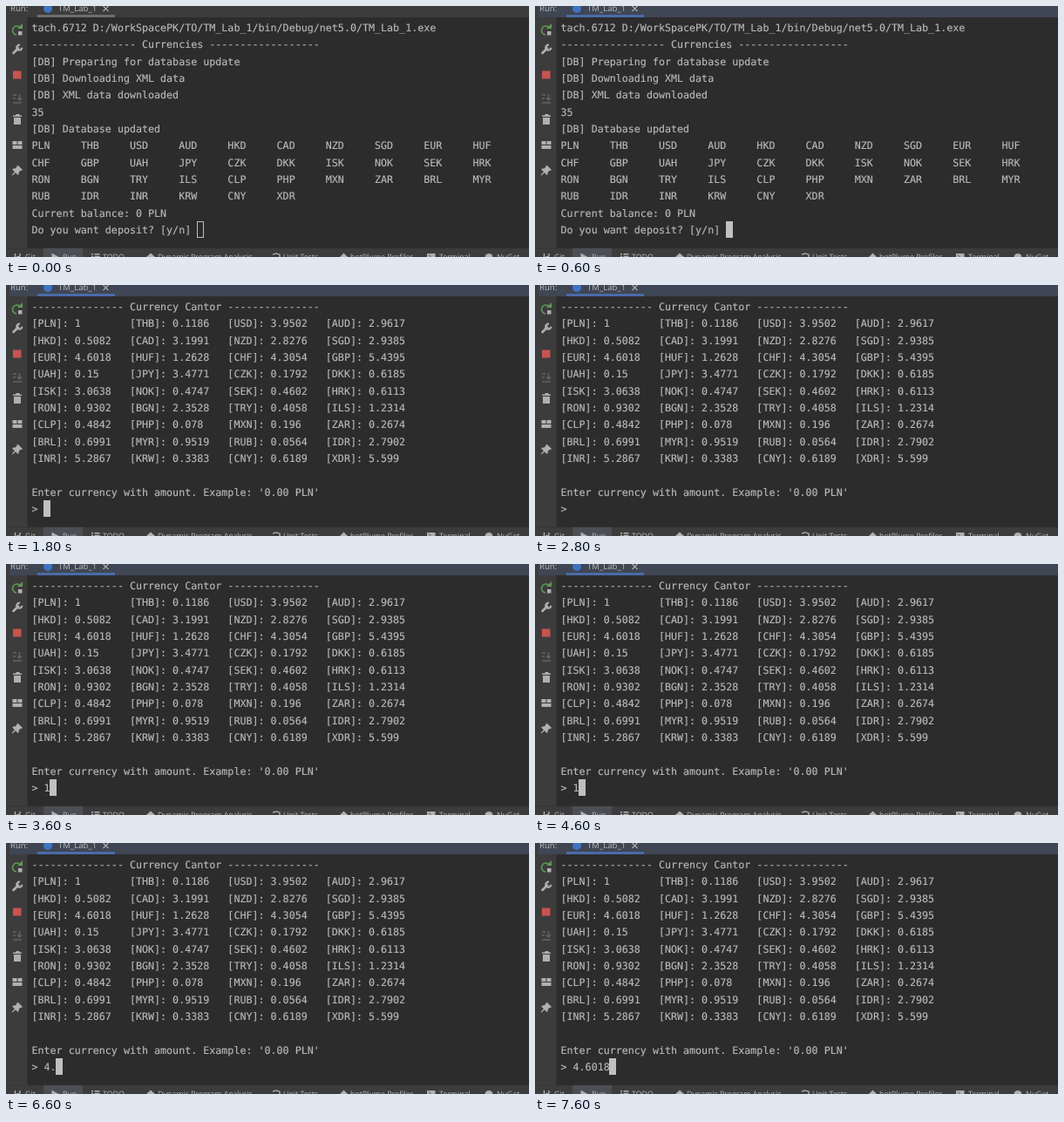
These frames come from a looping animation (600x288 px, 8000 ms). An HTML page:

```html
<!DOCTYPE html>
<html lang="en">
<head>
<meta charset="utf-8">
<title>Currency console</title>
<style>
  html, body { margin: 0; width: 100%; height: 100%; overflow: hidden; background: #2d2c2d; }
  svg { position: absolute; left: 0; top: 0; }
  svg text { font-family: "Open Sans", "Noto Sans", sans-serif; fill: #bbb; text-rendering: geometricPrecision; }
  .tab { font-size: 9.6px; }
  .tool { font-size: 8.8px; }
  .line { fill: none; stroke: #b0b0b0; stroke-width: 1.4; }
  .solid { fill: #b0b0b0; }
  #console {
    position: absolute; left: 29.5px; top: 16px; margin: 0; color: #b9b9b9;
    font: 11.68px/19.333px "DejaVu Sans Mono", monospace;
    text-rendering: geometricPrecision; font-variant-ligatures: none;
    -webkit-text-stroke: 0.15px #b9b9b9;
  }
  #cursor {
    position: absolute; top: 230.7px; width: calc(1ch + 1px); height: 19px;
    box-sizing: border-box; border: 1px solid #c0c0c0;
  }
</style>
</head>
<body>
<svg width="600" height="288" viewBox="0 0 600 288">
  <!-- window chrome -->
  <path fill="#3d3c3d" d="M0 0H600V13H24.5V278H600V288H0Z"/>
  <path id="header" d="M4 0H600V13H4Z"/>
  <path id="tabLine" d="M36 10H125V13H36Z"/>
  <path fill="#323232" d="M24 13h1V278h-1ZM0 277.5H600v.8H0Z"/>
  <path fill="#4b4e52" d="M43 278H88V288H43Z"/>
  <text class="tab" x="5" y="6">Run:</text>
  <circle cx="48" cy="3" r="5" fill="#3f74c4"/>
  <text class="tab" x="60" y="6">TM_Lab_1</text>
  <path class="line" style="stroke-width:1.1" d="M111.5 0l6 6m0-6l-6 6"/>

  <!-- side toolbar -->
  <path fill="none" stroke="#5f9a54" stroke-width="1.6" d="M16.5 25A5 5 0 1 0 12 33"/>
  <path fill="#5f9a54" d="M13 26h6v-6Z"/>
  <path class="solid" d="M14 29h4.5v4.5H14Z"/>
  <path class="line" stroke-linecap="round" style="stroke-width:2.6" d="M8.5 54l5.5-5.5"/>
  <path class="line" style="stroke-width:2.2" d="M16 44.8a3 3 0 1 0 2.3 3"/>
  <path fill="#c75450" d="M8 74.5h9.5v9H8Z"/>
  <path class="line" style="stroke:#646364" d="M8 102h4M8 106h3M8 111h10M15.5 101v7m-2.5-2.5l2.5 2.5l2.5-2.5"/>
  <path class="solid" d="M8 125.5h3l1-1.5h3l1 1.5h2v1.5H8ZM9 128h8v8H9Z"/>
  <path class="solid" d="M7.5 155h5v4h-5ZM13.5 155h5v4h-5ZM7.5 160h11v4h-11Z"/>
  <path class="solid" d="M14 183l5 5l-1.2 1l-1-.3l-2 2l-.2 2.3l-1 1l-2.7-2.7l-3.4 3.2l-.8-.8l3.2-3.4l-2.7-2.7l1-1l2.3-.2l2-2l-.3-1Z"/>

  <!-- bottom tool buttons -->
  <g class="line">
    <path d="M10.5 284v4M16 284v2.5q0 1.5-4 1.5"/>
    <path d="M98 284.7h2m1.5 0h6M98 287.5h2m1.5 0h6"/>
    <path d="M306 285.2l4-1.3l4 1.3V290"/>
  </g>
  <g class="solid">
    <path d="M52.5 283.5v9l8-4.5Z"/>
    <path d="M161 288l5-4.5l5 4.5Z"/>
    <path d="M383 288l4.5-4.5l4.5 4.5Z"/>
    <path d="M483 284h9.5v4H483Z"/>
    <circle cx="554" cy="288.5" r="4.5"/>
  </g>
  <path fill="none" stroke="#3d3c3d" d="M485 285.5l2 2l-2 2"/>
  <g id="tools"></g>
</svg>
<pre id="console"><span id="output"></span><span id="cursor"></span></pre>

<script>
const $ = id => document.getElementById(id);
const LOOP = 8000, FOCUS_AT = 600, RATES_AT = 1800;
const dashes = n => "-".repeat(n);
const grid = (cells, columns, width) => {
  const rows = [];
  for (let i = 0; i < cells.length; i += columns)
    rows.push(cells.slice(i, i + columns).map(c => c.padEnd(width)).join(""));
  return rows.join("\n");
};

const rates = `PLN 1,THB 0.1186,USD 3.9502,AUD 2.9617,HKD 0.5082,CAD 3.1991,NZD 2.8276,SGD 2.9385,
EUR 4.6018,HUF 1.2628,CHF 4.3054,GBP 5.4395,UAH 0.15,JPY 3.4771,CZK 0.1792,DKK 0.6185,
ISK 3.0638,NOK 0.4747,SEK 0.4602,HRK 0.6113,RON 0.9302,BGN 2.3528,TRY 0.4058,ILS 1.2314,
CLP 0.4842,PHP 0.078,MXN 0.196,ZAR 0.2674,BRL 0.6991,MYR 0.9519,RUB 0.0564,IDR 2.7902,
INR 5.2867,KRW 0.3383,CNY 0.6189,XDR 5.599`.split(",").map(r => r.trim().split(" "));

const startScreen = `tach.6712 D:/WorkSpacePK/TO/TM_Lab_1/bin/Debug/net5.0/TM_Lab_1.exe
${dashes(17)} Currencies ${dashes(18)}
[DB] Preparing for database update
[DB] Downloading XML data
[DB] XML data downloaded
35
[DB] Database updated
${grid(rates.map(r => r[0]), 10, 8)}
Current balance: 0 PLN
Do you want deposit? [y/n] `;

const ratesScreen = `${dashes(15)} Currency Cantor ${dashes(15)}
${grid(rates.map(([code, rate]) => `[${code}]: ${rate}`), 4, 16)}

Enter currency with amount. Example: '0.00 PLN'
> `;

// [start time, typed text, cursor style]
const steps = [
  [0, "", "hollow"], [600, "", "on"], [1600, "", "off"],
  [1800, "", "on"], [2800, "", "off"], [3400, "", "on"],
  [3600, "1", "on"], [4200, "1", "off"], [4600, "1", "on"],
  [5200, "", "off"], [5400, "", "on"], [5600, "4", "on"],
  [6600, "4.", "on"], [6800, "4.6", "on"], [7200, "4.601", "on"], [7600, "4.6018", "on"]
];

const tools = [
  [22, "Git"], [65, "Run"], [111, "TODO"], [174, "Dynamic Program Analysis"], [318, "Unit Tests"],
  [395, "hotPlume Profiler"], [497, "Terminal"], [563, "NuGet"]
];
$("tools").innerHTML = tools.map(([x, label]) => `<text class="tool" x="${x}" y="291">${label}</text>`).join("");

function render(time) {
  const [, typed, cursor] = steps.findLast(step => step[0] <= time);
  const text = (time < RATES_AT ? startScreen : ratesScreen) + typed;
  if ($("output").textContent !== text) $("output").textContent = text;

  const style = $("cursor").style;
  style.left = `calc(${text.length - text.lastIndexOf("\n") - 1}ch - 0.5px)`;
  style.background = cursor === "on" ? "#c0c0c0" : "none";
  style.visibility = cursor === "off" ? "hidden" : "visible";

  const focused = time >= FOCUS_AT;
  $("header").setAttribute("fill", focused ? "#3f4654" : "#3d3c3d");
  $("tabLine").setAttribute("fill", focused ? "#4a6ca8" : "#6e6d6e");
}

const start = performance.now();
function tick() {
  render((performance.now() - start) % LOOP);
  requestAnimationFrame(tick);
}
tick();
</script>
</body>
</html>
```
